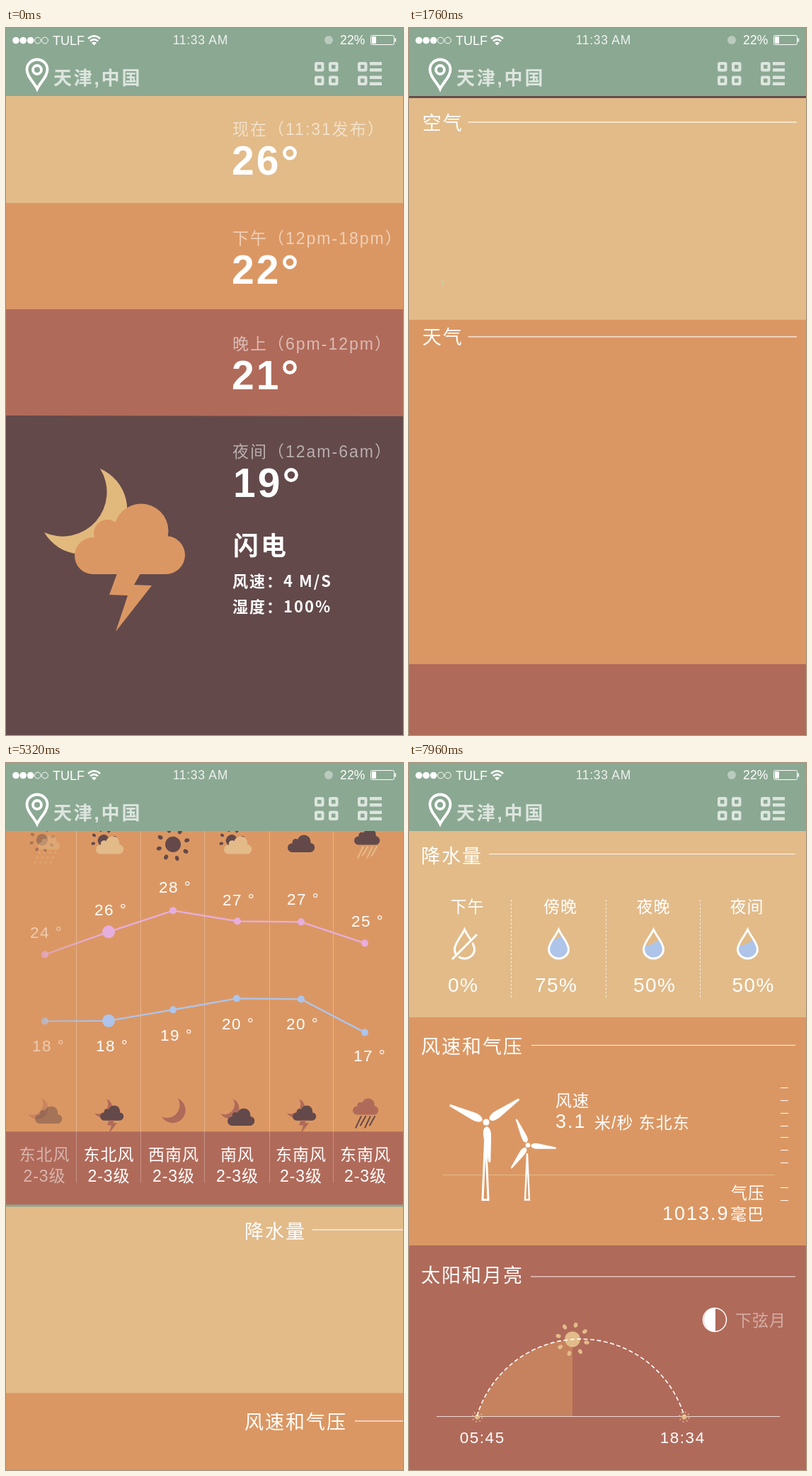
Recreate the animation shown at these times as an HTML page. Size 561x998 px, loop 8 s.

```html
<!DOCTYPE html>
<html lang="zh">
<head>
<meta charset="utf-8">
<title>天气</title>
<style>
html,body{margin:0;width:100%;height:100%;overflow:hidden;background:#8ba892}
svg{display:block;width:100vw;height:100vh}
text{font-family:"Liberation Sans","Noto Sans CJK SC","Noto Sans CJK JP","Noto Sans CJK",sans-serif;fill:#fff;white-space:pre}
.cjk{font-family:"Noto Sans CJK SC","Noto Sans CJK JP","Noto Sans CJK",sans-serif}
</style>
</head>
<body>
<svg id="stage" viewBox="0 0 561 998" preserveAspectRatio="none"></svg>
<script>
const GREEN = '#8ba892', TAN = '#e2bb89', ORANGE = '#db9763', RED = '#b06a5a', DARK = '#63494a';
const LOOP = 8000, RAD = Math.PI / 180;
const cols = [0, 1, 2, 3, 4, 5];

// --- drawing helpers, each returns SVG markup ---
const rect = (x, y, w, h, fill, extra = '') =>
  `<rect x="${x}" y="${y}" width="${w}" height="${h}" fill="${fill}" ${extra}/>`;
const line = (x1, y1, x2, y2, extra = '') =>
  `<path d="M${x1} ${y1}L${x2} ${y2}" stroke="#fff" fill="none" ${extra}/>`;
const dot = (x, y, r, fill, extra = '') =>
  `<circle cx="${x}" cy="${y}" r="${r}" fill="${fill}" ${extra}/>`;
const hoop = (x, y, r, w) => dot(x, y, r, 'none', `stroke="#fff" stroke-width="${w}"`);
const fade = (a, b, body) => `<g data-a="${a}" data-b="${b}">${body}</g>`;

// y is the vertical middle of the glyphs
function text(x, y, str, size, o = {}) {
  const ls = o.ls ?? 1, anchor = o.anchor || 'start';
  return `<text x="${anchor === 'middle' ? x + ls / 2 : x}" y="${y + size * .37}" font-size="${size}"
    letter-spacing="${ls}" text-anchor="${anchor}" font-weight="${o.w || 300}" opacity="${o.op ?? 1}"
    class="${o.cls || ''}">${str}</text>`;
}
const mid = (x, y, str, size, o = {}) => text(x, y, str, size, { ...o, anchor: 'middle' });

const round = (x, y, r) => `M${x - r} ${y}a${r} ${r} 0 1 1 ${2 * r} 0a${r} ${r} 0 1 1 ${-2 * r} 0Z`;
const CLOUD = round(123, 745, 26) + round(143, 713, 19) + round(191, 710, 38.5) +
  round(226, 744, 27) + 'M130 715H226V771H123V740Z';
const MOON = 'M133 622A63 63 0 1 1 54 712A62.5 62.5 0 0 0 133 622Z';
const BOLT = 'M157 770H190L181 786L206 787L155 852L172 801L146 800Z';

const place = (d, ox, oy, ow) => (x, y, w, fill) =>
  `<path d="${d}" fill="${fill}" transform="translate(${x} ${y}) scale(${w / ow}) translate(${-ox} ${-oy})"/>`;
const cloud = place(CLOUD, 97, 671, 155);
const moon = place(MOON, 54, 622, 115);
const bolt = place(BOLT, 146, 770, 60);

function sunPath(r, far, long, wide) {
  let d = round(0, 0, r);
  for (let i = 0; i < 8; i++) {
    const a = i * 45, c = Math.cos(a * RAD), s = Math.sin(a * RAD);
    const p = k => `${(k * c).toFixed(2)} ${(k * s).toFixed(2)}`;
    const arc = `A${long} ${wide} ${a} 1 1 `;
    d += `M${p(far - long)}${arc}${p(far + long)}${arc}${p(far - long)}Z`;
  }
  return d;
}
const sun = (x, y, k, fill, id = '') =>
  `<g ${id && `id="${id}"`} transform="translate(${x} ${y}) scale(${k})"><path class="spin" d="${sunPath(11, 20.5, 3.6, 2.7)}" fill="${fill}"/></g>`;

function rain(x, y, n, stroke) {
  let d = '';
  for (let i = 0; i < n; i++) d += `M${x + i * 6.5 + 6} ${y}l-8 ${17 - (i % 2) * 3}`;
  return `<path d="${d}" stroke="${stroke}" stroke-width="2" fill="none"/>`;
}
function drizzle(x, y) {
  let d = '';
  for (let r = 0; r < 3; r++) for (let i = 0; i < 4; i++)
    d += round(x + i * 7.5 - r * 3, y + r * 7, 1.7);
  return `<path id="drizzle" d="${d}" fill="${TAN}"/>`;
}

const title = (y, str, x, ly, page, lineIn) => {
  const ln = line(x, ly, 546, ly, 'stroke-width="1.2" opacity=".9"');
  return `<g class="slide${page}">${text(17, y, str, 27, { ls: 2 })}${lineIn ? fade(1400, 1750, ln) : ln}</g>`;
};

// --- page one: the day in bands ---
function pageOne() {
  const rows = [
    [319, 142, '现在（11:31发布）', 187, '26'], [319, 296, '下午（12pm-18pm）', 341, '22'],
    [319, 445, '晚上（6pm-12pm）', 489.5, '21'], [321, 597, '夜间（12am-6am）', 641.5, '19']];
  return rect(0, 90, 561, 157, TAN) + rect(0, 247, 561, 151, ORANGE) + rect(0, 397, 561, 152, RED) +
    `<path d="M0 547L561 548V999H0Z" fill="${DARK}"/>` +
    rows.map(([x, y, label, ny, deg]) => text(320, y, label, 23, { ls: 2, op: .55 }) +
      text(x, ny - 1, deg, 57, { ls: 3, w: 700 }) + hoop(x + 82, ny - 10.5, 7.6, 4.6)).join('') +
    text(321, 730.5, '闪电', 36, { ls: 3, w: 700 }) +
    text(320, 781, '风速：4 M/S', 22, { ls: 2, w: 700, cls: 'cjk' }) +
    text(320, 817, '湿度：100%', 22, { ls: 2, w: 700, cls: 'cjk' }) +
    moon(54, 622, 115, '#e2b97d') +
    `<g id="flash">${bolt(146, 770, 60, ORANGE)}</g>` + cloud(97, 671, 155, ORANGE);
}

// --- page two: the week ---
const midX = [53.5, 144.5, 236, 326, 416, 507];
const dim = i => i ? 1 : .5;
const AQUA = '#aee3cd', LIME = '#dfe3ab', PINK = '#e6aedd', BLUE = '#aec4ea';

// horizontal stroke colour, pale over yesterday
const tone = (id, stops) => `<linearGradient id="${id}" gradientUnits="userSpaceOnUse" x1="52" y1="0" x2="511" y2="0">
  <stop offset="0" stop-color="${stops[0][1]}" stop-opacity=".55"/>
  ${stops.map(([at, c]) => `<stop offset="${at}" stop-color="${c}"/>`).join('')}</linearGradient>`;
const path = pts => 'M' + pts.map(p => p.join(' ')).join('L');
const chart = (d, id) => `<path d="${d}" fill="none" stroke="url(#${id})" stroke-width="2.4"/>`;
const dots = (pts, colors) => pts.map(([x, y], i) =>
  dot(x, y, i === 1 ? 9 : 5, colors[i % colors.length], `opacity="${i ? 1 : .65}"`)).join('');

function icons() {
  const day = [
    sun(51, 483, .75, DARK) + cloud(45, 477, 31, TAN) + drizzle(47, 501),
    sun(138, 484, .75, DARK) + cloud(127, 478, 39, TAN),
    sun(236, 489.5, 1, DARK),
    sun(319, 484, .75, DARK) + cloud(308, 478, 39, TAN),
    cloud(398, 476, 38, DARK),
    cloud(492, 467, 36, DARK) + rain(499, 492, 4, TAN)];
  const night = [
    moon(31, 848, 28, RED) + cloud(41, 859, 38, DARK),
    moon(125, 849, 25, RED) + cloud(133, 858, 33, DARK) + bolt(143, 879, 14, RED),
    moon(220, 848, 33, RED),
    moon(303, 849, 26, RED) + cloud(313, 862, 38, DARK),
    moon(397, 849, 25, RED) + cloud(405, 858, 33, DARK) + bolt(414, 879, 14, RED),
    cloud(490, 848, 36, RED) + rain(496, 873, 4, DARK)];
  return cols.map(i => `<g class="icon" data-k="${i ? 1 : .45}">${day[i]}${night[i]}</g>`).join('');
}

function pageTwo() {
  const days = ['昨天', '今天', '周一', '周二', '周三', '周四'];
  const air = [[52, 357], [144, 355], [236, 323], [327, 317], [419, 345], [511, 359]];
  const high = [[55, 645], [145, 613], [236, 583], [327, 598], [417, 599], [507, 629]];
  const low = [[55, 739], [145, 738.5], [236, 723], [326, 707], [417, 708], [507, 755]];
  const airY = [326, 322, 291, 284, 314, 324];
  const highT = [[24, 34, 613], [26, 125, 581], [28, 216, 549], [27, 306, 567], [27, 397, 566], [25, 488, 597]];
  const lowT = [[18, 37, 773], [18, 127, 773], [19, 218, 758], [20, 305, 742], [20, 396, 742], [17, 491, 787]];
  const winds = ['东北风', '东北风', '西南风', '南风', '东南风', '东南风'];
  const temp = ([n, x, y], i) => text(x, y, n + ' °', 22.5, { ls: 1.5, op: dim(i) });
  const bars = [99.5, 190.5, 280.5, 372.5, 462.5].map(x => line(x, 240, x, 409) + line(x, 468, x, 967)).join('');
  const curve = 'M52 357L144 355C175 354 205 333 236 323C262 314 300 315 327 317C355 321 390 338 419 345C445 353 480 357 511 359';
  return rect(0, 96, 561, 313.5, TAN) + rect(0, 409, 561, 486.5, ORANGE) + rect(0, 895, 561, 103, RED) +
    title(131, '空气', 82, 130, 1, true) + title(433, '天气', 82, 433, 1, true) +
    fade(1800, 2300, cols.map(i =>
      mid(midX[i], 178, days[i], 23, { op: dim(i) }) +
      mid(midX[i], 212, '9/' + (5 + i), 18.5, { op: dim(i) }) +
      mid(midX[i] + .5, 927, winds[i], 23, { op: dim(i) }) +
      mid(midX[i] + .5, 957, '2-3级', 23, { op: dim(i) })).join('')) +
    fade(3400, 4500, `<g opacity=".27">${bars}</g>`) +
    `<g clip-path="url(#reveal)">` +
      chart(curve, 'airTone') + dots(air, [AQUA, AQUA, LIME, LIME, AQUA, AQUA]) +
      chart(path(high), 'highTone') + dots(high, [PINK]) +
      chart(path(low), 'lowTone') + dots(low, [BLUE]) + `</g>` +
    fade(2840, 3200, cols.map(i =>
      mid(air[i][0], airY[i], '优优良良优优'[i], 23, { op: dim(i) }) + temp(highT[i], i) + temp(lowT[i], i)).join('')) +
    icons();
}

// --- page three: rain, wind, sun ---
const DROP = 'M0 -20C5 -9 14 -1 14 8A14 13 0 0 1 -14 8C-14 -1 -5 -9 0 -20Z';
const BLADE = 'M6 0C8 -6 16 -6 24 -5L56 -1.5Q58 0 56 1.5L24 5C16 6 8 6 6 0Z';
const chance = [0, 75, 50, 50];
const ARC = { x: 242.5, y: 966, r: 153 };

function turbine(id, x, y, k, top, half) {
  const blades = [0, 120, 240].map(a => `<path d="${BLADE}" transform="rotate(${a})"/>`).join('');
  return `<path d="M${x - 1} ${top + 5}L${x - 1 - half} 616.5H${x - 1 + half}Z" fill="${ORANGE}" stroke="#fff" stroke-width="${k < 1 ? 2.4 : 3}"/>
    <g transform="translate(${x} ${y}) scale(${k})" fill="#fff"><g id="${id}">${blades}</g><circle r="4.6"/></g>`;
}

function pageThree() {
  const dropX = [78.5, 211.5, 345.5, 478.5], labelX = [82, 213.5, 345, 477], pctX = [76, 207.5, 346.5, 486];
  const names = ['下午', '傍晚', '夜晚', '夜间'];
  const drops = dropX.map((x, i) => `<g transform="translate(${x} 255)">
    <g clip-path="url(#drop)"><path class="water" d="M-20 4Q-6 5 2 -1T20 -5V40H-20Z" fill="#aec4e8"/></g>
    <path d="${DROP}" fill="none" stroke="#fff" stroke-width="3"/></g>`).join('');
  const ticks = [459, 477, 495, 513, 529, 547, 565, 600, 618].map((y, i) =>
    fade(6400 + i * 50, 6600 + i * 50, line(525, y - .5, 536, y - .5))).join('');
  const end = ARC.x + 146.5;
  return rect(0, 96, 561, 263.5, TAN) + rect(0, 359, 561, 322.5, ORANGE) + rect(0, 681, 561, 330, RED) +
    title(131, '降水量', 113, 128.5, 2) + title(400, '风速和气压', 173, 398.5, 2) + title(723, '太阳和月亮', 172, 725, 2) +
    fade(5700, 6150, names.map((n, i) => mid(labelX[i], 202, n, 23)).join('') + drops) +
    fade(6400, 6800, [144.5, 278.5, 411.5].map(x => line(x, 193, x, 333, 'stroke-dasharray="3 2.4" opacity=".75"')).join('') +
      pctX.map((x, i) => `<g data-pct="${i}">${mid(x, 313, '0%', 28, { ls: 1.5 })}</g>`).join('')) +
    fade(6600, 6900, line(62, 278, 97, 243, `style="stroke:${TAN}" stroke-width="5"`) + line(61, 277, 96, 242, 'stroke-width="3"')) +
    `<path id="ground" stroke="${TAN}" stroke-width="1.2"/>` + ticks +
    fade(5650, 6100, turbine('wheelA', 109, 507, 1, 518, 4) + turbine('wheelB', 168, 539.5, .71, 546, 3) +
      text(207, 476, '风速', 23) +
      text(207, 505, '3.1', 27, { ls: 2 }) + text(262, 507, '米/秒 东北东', 23)) +
    fade(6700, 7100, text(455, 606, '气压', 23) + text(358, 635, '1013.9', 27, { ls: 2 }) + text(454, 636.5, '毫巴', 23)) +
    fade(5600, 5950, `<path id="lit" fill="${ORANGE}" opacity=".52"/>` +
      line(39, 922.5, 524, 922.5, 'opacity=".75"') +
      sun(96.5, 923, .33, TAN) + sun(end, 923, .33, TAN) + sun(0, 0, 1, TAN, 'orb') +
      `<path d="M96 922A${ARC.r} ${ARC.r} 0 0 1 ${end} 922" fill="none" stroke="#fff" stroke-width="1.6" stroke-dasharray="6 3.5"/>`) +
    fade(6500, 7000, mid(103, 952, '05:45', 22.5, { ls: 1.5 }) + mid(386, 952, '18:34', 22.5, { ls: 1.5 })) +
    fade(7300, 7600, hoop(432, 786, 16.5, 1.5) +
      '<path d="M433 769.5A16.5 16.5 0 0 0 433 802.5Z" fill="#fff"/>') +
    fade(7700, 8280, text(461, 786, '下弦月', 23));
}

// --- status bar and toolbar ---
function header() {
  const cell = (x, y) => rect(x + 2, y + 2, 9.5, 9.5, 'none', 'rx="1" stroke="#fff" stroke-width="4"');
  return rect(0, 0, 561, 96, GREEN) +
    [14, 24.2, 34.6].map(x => dot(x, 17.5, 4.8, '#fff')).join('') +
    [44.8, 55].map(x => hoop(x, 17.5, 4.4, 1)).join('') +
    text(66, 17, 'TULF', 18, { ls: 0, w: 400 }) +
    `<path d="M116 15Q124.5 7.5 133 15M119 18.6Q124.5 13.8 130 18.6" fill="none" stroke="#fff" stroke-width="2.6"/>
     <path d="M121 21Q124.5 18.4 128 21L124.5 24.5Z" fill="#fff"/>` +
    mid(274.5, 17, '11:33 AM', 17.5, { ls: .7, w: 400, op: .85 }) +
    dot(456, 17, 6, '#fff', 'opacity=".4"') +
    text(472, 17, '22%', 17.5, { ls: .2, w: 400 }) +
    rect(515.5, 10.5, 33, 13, 'none', 'rx="2" stroke="#fff"') + rect(517, 12, 6, 10, '#fff') + rect(549.5, 14.5, 1.6, 5, '#fff') +
    `<path d="M44 86C40 77 29.5 69 29.5 58.5A14.5 14 0 0 1 58.5 58.5C58.5 69 48 77 44 86Z" fill="none" stroke="#fff" stroke-width="3.8"/>` +
    hoop(44, 59, 6, 3.8) +
    text(67, 70, '天津,中国', 26, { ls: 2.8, w: 700, op: .7 }) +
    `<g opacity=".7">${cell(436, 48)}${cell(456, 48)}${cell(436, 67.5)}${cell(456, 67.5)}${cell(497, 48)}${cell(497, 67.5)}` +
    [48, 57, 67.5, 76.5].map(y => rect(514, y, 17, 4.5, '#fff')).join('') + '</g>';
}

const svg = document.getElementById('stage');
svg.innerHTML = `<defs>
  <clipPath id="reveal"><rect id="wipe" x="40" y="230" width="0" height="600"/></clipPath>
  <clipPath id="drop"><path d="${DROP}"/></clipPath>
  ${tone('airTone', [[.2, AQUA], [.4, LIME], [.6, LIME], [.8, AQUA]])}
  ${tone('highTone', [[.2, PINK]])}${tone('lowTone', [[.2, BLUE]])}</defs>
  <g id="scroll"><g>${pageOne()}</g><g transform="translate(0 903)">${pageTwo()}</g><g transform="translate(0 1808)">${pageThree()}</g></g>
  <circle id="ring" cx="281" r="254" fill="none" stroke="#ffeadb" stroke-width="4"/>${header()}`;

// --- motion ---
const $ = id => document.getElementById(id);
const all = q => [...svg.querySelectorAll(q)];
const fades = all('[data-a]').map(e => [e, +e.dataset.a, +e.dataset.b]);
const iconEls = all('.icon'), spins = all('.spin'), water = all('.water'), pcts = all('[data-pct] text');
const slides = [all('.slide1'), all('.slide2')];
const set = (e, k, v) => e.setAttribute(k, v);
const ramp = (t, a, b) => Math.min(1, Math.max(0, (t - a) / (b - a)));
const inOut = x => x < .5 ? 4 * x ** 3 : 1 - 4 * (1 - x) ** 3;
const out = (x, p) => 1 - (1 - x) ** p;
const wave = x => .5 + .5 * Math.cos(2 * Math.PI * x);
const glow = u => .4 * ramp(u, 100, 640) * (1 - ramp(u, 850, 1315));

function draw(t) {
  const s = [inOut(ramp(t, 854, 1854)), inOut(ramp(t, 4851.5, 5851.5))];
  set($('scroll'), 'transform', `translate(0 ${-(903 * s[0] + 905 * s[1])})`);
  slides.forEach((list, i) => list.forEach(e => set(e, 'transform', `translate(${546 * (1 - s[i])} 0)`)));

  const u = t % 4000;
  set($('ring'), 'cy', 1224 - .031 * (u - 640));
  set($('ring'), 'opacity', glow(u));

  for (const [e, a, b] of fades) set(e, 'opacity', ramp(t, a, b));
  const shown = ramp(t, 2840, 3200);
  for (const e of iconEls) {
    set(e, 'fill-opacity', shown * e.dataset.k);
    set(e, 'stroke-opacity', shown * e.dataset.k);
  }
  for (const e of spins) set(e, 'transform', `rotate(${10 + .028 * (t - 3040)})`);
  set($('flash'), 'opacity', wave(t / 1600));
  set($('drizzle'), 'opacity', wave((t - 4640) / 1100 + .5));
  set($('wipe'), 'width', 482 * out(ramp(t, 1750, 2680), 1.6));

  const fill = out(ramp(t, 6400, 7300), 2);
  water.forEach((e, i) => {
    const rise = chance[i] && 15 + chance[i] * .32;
    set(e, 'transform', `translate(0 ${30 - rise * fill})`);
  });
  pcts.forEach((e, i) => { e.textContent = Math.round(chance[i] * fill) + '%'; });
  set($('ground'), 'd', `M47 581.5H${47 + 470 * out(ramp(t, 6600, 7000), 2)}`);

  set($('wheelA'), 'transform', `rotate(${-58.7 + .0876 * (t - 6320)})`);
  set($('wheelB'), 'transform', `rotate(${49 + .12 * (t - 6320)})`);

  const a = (-73.3 + 69 * out(ramp(t, 5850, 7250), 3)) * RAD;
  const x = ARC.x + ARC.r * Math.sin(a), y = ARC.y - ARC.r * Math.cos(a);
  set($('orb'), 'transform', `translate(${x} ${y})`);
  set($('lit'), 'd', `M96 922.5A${ARC.r} ${ARC.r} 0 0 1 ${x} ${y}V922.5Z`);
}

function tick() {
  draw(performance.now() % LOOP);
  requestAnimationFrame(tick);
}
tick();
</script>
</body>
</html>
```
